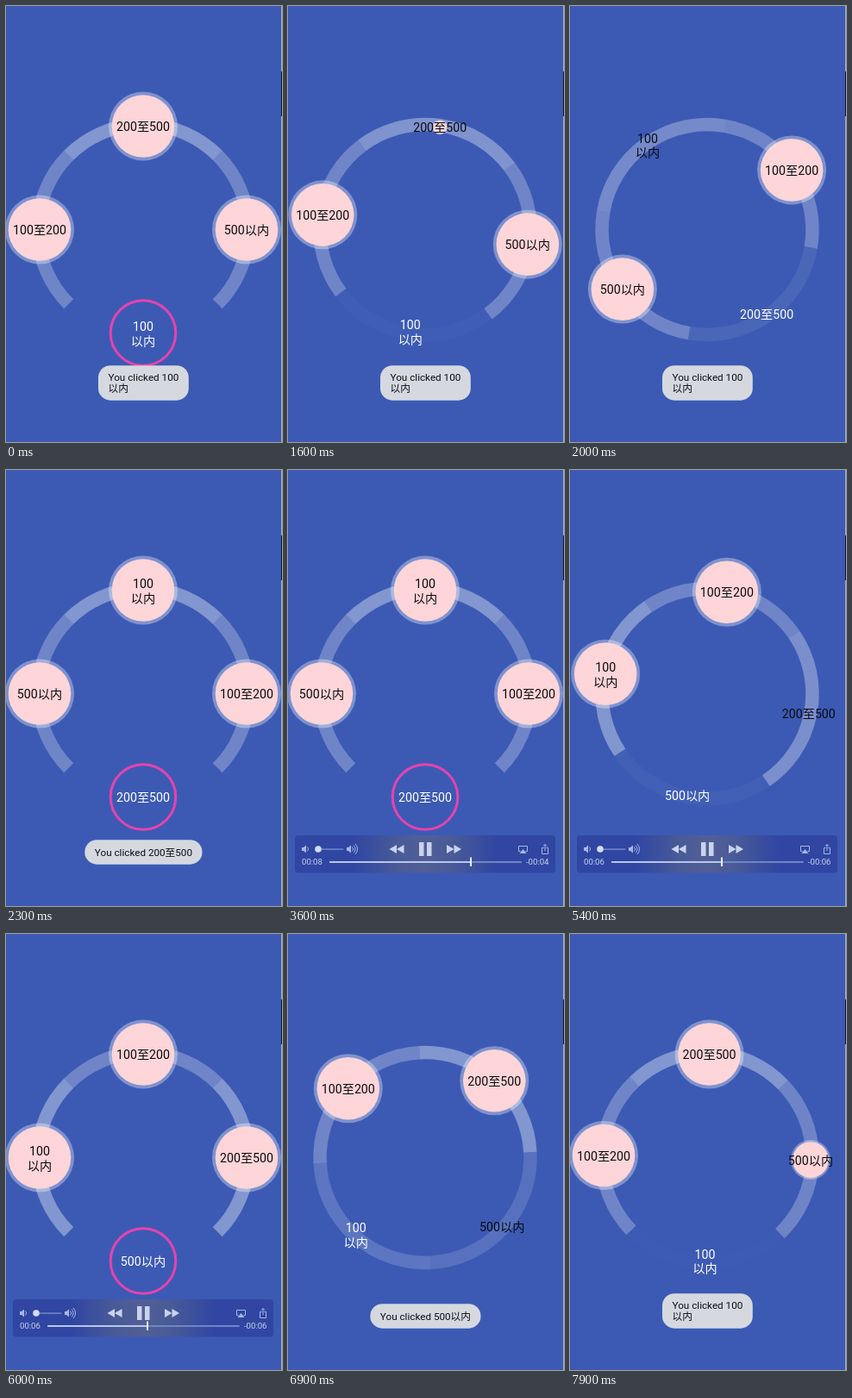
An HTML page with a canvas that plays this animation: 320 px wide and 506 px high, repeating every 8000 ms.

```html
<!DOCTYPE html>
<html lang="zh">
<head>
<meta charset="utf-8">
<title>Ring menu</title>
<style>
html, body { margin: 0; width: 100%; height: 100%; overflow: hidden; background: #3c5ab4; }
canvas { display: block; }
</style>
</head>
<body>
<canvas id="stage" width="320" height="506"></canvas>
<script>
const ctx = document.getElementById('stage').getContext('2d');
const LOOP = 8000, TURN = 700, SHRINK = .175, CX = 159, CY = 259.5, R = 120;
const FONT = 'Roboto, "Noto Sans CJK SC", "Noto Sans CJK", sans-serif';
const ICON = '#c9d3ee', DIM = '#a9b7e4';
const rad = deg => deg * Math.PI / 180;
const clamp = v => Math.max(0, Math.min(1, v));

// Clockwise from the bottom at the start
const items = [
  { lines: ['100', '以内'], alpha: .36 },
  { lines: ['100至200'], alpha: .26 },
  { lines: ['200至500'], alpha: .36 },
  { lines: ['500以内'], alpha: .26 }
];
const moves = [
  { start: 1505, from: 0, to: 2, turn: 180 },
  { start: 4860, from: 2, to: 3, turn: -90 },
  { start: 6536, from: 3, to: 0, turn: -90 },
  { start: 7849, from: 0, to: 3, turn: 90 }
];

function pose(t) {
  const s = { rot: 0, selected: 0, move: null, u: 0, p: 0 };
  for (const m of moves) {
    const u = clamp((t - m.start) / TURN);
    const p = (1 - Math.cos(Math.PI * u)) / 2;
    s.rot += m.turn * p;
    if (u === 1) s.selected = m.to;
    else if (u > 0) Object.assign(s, { move: m, u, p });
  }
  return s;
}

function disc(x, y, r, fill) {
  ctx.fillStyle = fill;
  ctx.beginPath();
  ctx.arc(x, y, r, 0, 7);
  ctx.fill();
}

function circle(x, y, r, width, color) {
  ctx.strokeStyle = color;
  ctx.lineWidth = width;
  ctx.beginPath();
  ctx.arc(x, y, r, 0, 7);
  ctx.stroke();
}

function box(x, y, w, h, r, fill) {
  ctx.fillStyle = fill;
  ctx.beginPath();
  ctx.roundRect(x, y, w, h, r);
  ctx.fill();
}

function shape(points, fill) {
  ctx.fillStyle = fill;
  ctx.beginPath();
  points.forEach(([x, y]) => ctx.lineTo(x, y));
  ctx.closePath();
  ctx.fill();
}

function label(text, x, y, size, color, align = 'center') {
  ctx.font = `${size}px ${FONT}`;
  ctx.textAlign = align;
  ctx.fillStyle = color;
  ctx.fillText(text, x, y);
}

function drawMenu({ rot, selected, move, u, p }) {
  const view = items.map((item, i) => {
    const angle = rad(180 + 90 * i + rot);
    const v = { item, x: CX + R * Math.sin(angle), y: CY - R * Math.cos(angle),
      angle: angle - Math.PI / 2, weight: 1, scale: 1, color: '#0c0c0e', ring: false };
    if (move && i === move.to) {
      v.weight = 1 - p;
      v.scale = clamp(1 - u / SHRINK);
      if (u >= .5) v.color = '#fff';
    } else if (move && i === move.from) {
      v.weight = p;
      v.scale = clamp(1 - (1 - u) / SHRINK);
      if (u < .5) v.color = '#fff';
    } else if (!move && i === selected) {
      Object.assign(v, { weight: 0, scale: 0, color: '#fff', ring: true });
    }
    return v;
  });

  for (const v of view) {
    ctx.strokeStyle = `rgba(255,255,255,${v.item.alpha * v.weight})`;
    ctx.lineWidth = 15.5;
    ctx.beginPath();
    ctx.arc(CX, CY, 122, v.angle - Math.PI / 4, v.angle + Math.PI / 4);
    ctx.stroke();
  }
  for (const v of view) {
    if (v.scale > 0) {
      disc(v.x, v.y, 40 * v.scale, 'rgba(255,255,255,.34)');
      disc(v.x, v.y, 36.3 * v.scale, '#fed5d8');
    }
    if (v.ring) circle(v.x, v.y, 37.8, 3, '#e743ae');
    const { lines } = v.item;
    lines.forEach((line, k) =>
      label(line, v.x, v.y + 5.6 + (k - (lines.length - 1) / 2) * 16.8, 14.2, v.color));
  }
}

function drawToast(lines) {
  ctx.font = `11.7px ${FONT}`;
  const w = Math.max(...lines.map(l => ctx.measureText(l).width)) + 23;
  const x = 159.4 - w / 2, h = lines.length > 1 ? 40.5 : 28.5;
  box(x, 457.7 - h, w, h, 14, '#d5d9df');
  lines.forEach((line, k) =>
    label(line, x + 11.5, 448 + (k - lines.length + 1) * 13.5, 11.7, '#0c0d10', 'left'));
}

function speaker(x, waves) {
  shape([[x, 438], [x + 2, 438], [x + 5, 435.5], [x + 5, 444.5], [x + 2, 442], [x, 442]], DIM);
  ctx.strokeStyle = DIM;
  ctx.lineWidth = 1;
  for (let i = 0; i < waves; i++) {
    ctx.beginPath();
    ctx.arc(x + 4, 440, 3.5 + 2.5 * i, -.8, .8);
    ctx.stroke();
  }
}

function skip(x, dir) {
  for (const d of [0, 8.5])
    shape([[x + dir * d, 435], [x + dir * (d + 8.5), 440], [x + dir * d, 445]], ICON);
}

function drawPlayer(t) {
  const show = clamp((t - 2600) / 300) * clamp((6500 - t) / 300);
  if (!show) return;
  ctx.save();
  ctx.globalAlpha = show;

  // The notice behind the panel shows as a soft grey band
  const panel = ctx.createLinearGradient(76, 0, 242, 0);
  panel.addColorStop(0, '#3046a2');
  panel.addColorStop(.3, '#485a98');
  panel.addColorStop(.5, '#525f96');
  panel.addColorStop(.7, '#485a98');
  panel.addColorStop(1, '#3046a2');
  box(8, 424, 302, 43.5, 4, panel);

  speaker(16, 1);
  box(35, 439.5, 29.5, 1.2, 1, '#7f94cf');
  disc(35, 440, 3.8, '#d3ddf8');
  speaker(68, 3);
  skip(134.5, -1);
  skip(184, 1);
  box(152, 432, 5.5, 16, 0, ICON);
  box(161, 432, 5.5, 16, 0, ICON);

  ctx.strokeStyle = DIM;
  ctx.lineWidth = 1;
  ctx.beginPath();
  ctx.moveTo(269.5, 442.5);
  ctx.lineTo(267.5, 442.5);
  ctx.lineTo(267.5, 436.5);
  ctx.lineTo(277.5, 436.5);
  ctx.lineTo(277.5, 442.5);
  ctx.lineTo(275.5, 442.5);
  ctx.moveTo(296.5, 438.5);
  ctx.lineTo(294.5, 438.5);
  ctx.lineTo(294.5, 445.5);
  ctx.lineTo(301.5, 445.5);
  ctx.lineTo(301.5, 438.5);
  ctx.lineTo(299.5, 438.5);
  ctx.moveTo(298, 442);
  ctx.lineTo(298, 434.5);
  ctx.moveTo(296, 436.5);
  ctx.lineTo(298, 434.5);
  ctx.lineTo(300, 436.5);
  ctx.stroke();
  shape([[272.5, 440], [276.5, 445], [268.5, 445]], DIM);

  const x = 184 - (t - 5000) / 50;
  const time = (x - 48) / 223 * 12;
  const clock = s => '00:' + String(s).padStart(2, '0');
  label(clock(Math.floor(time)), 16, 458.3, 9.6, ICON, 'left');
  label('-' + clock(Math.ceil(12 - time)), 302.5, 458.3, 9.6, ICON, 'right');
  box(48, 454, 223, 2, 1, '#6f85c4');
  box(48, 454, x - 48, 2, 1, '#b9c6ea');
  box(x - 1, 449.5, 2, 10.5, 0, '#e6ecfc');
  ctx.restore();
}

function draw(now) {
  const t = now % LOOP, state = pose(t);
  box(0, 0, 320, 506, 0, '#3c5ab4');
  box(319, 0, 1, 506, 0, '#a4aec8');
  box(319, 76, 1, 52, 0, '#15181f');
  drawMenu(state);
  const { lines } = items[state.selected];
  drawToast(['You clicked ' + lines[0], ...lines.slice(1)]);
  drawPlayer(t);
}

const begin = performance.now();
function tick() {
  draw(performance.now() - begin);
  requestAnimationFrame(tick);
}
tick();
</script>
</body>
</html>
```
